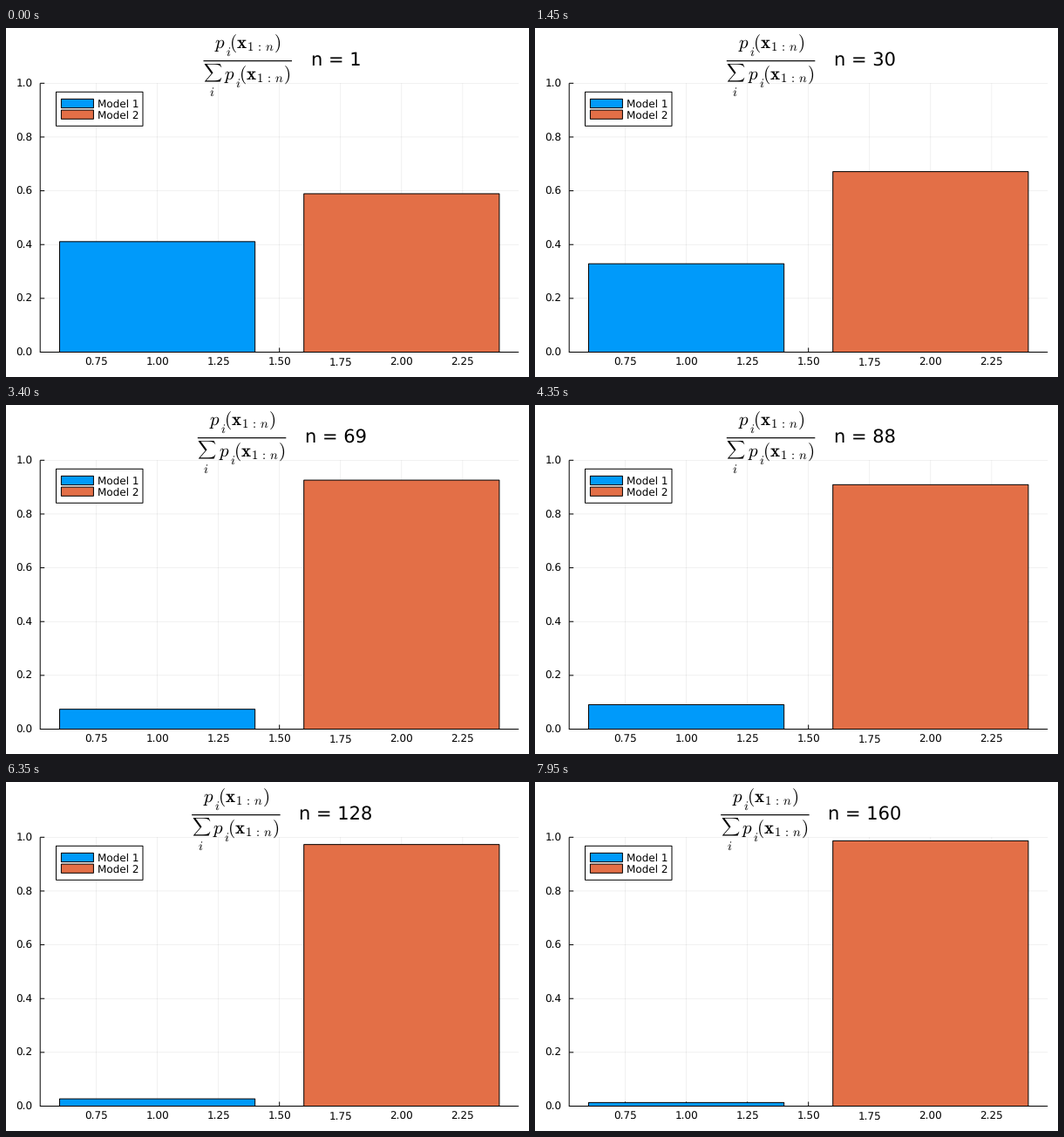
Recreate the animation shown at these times as a matplotlib script. Size 600 px wide and 400 px high, loop 8 s.

```python
import numpy as np
import matplotlib
import matplotlib.pyplot as plt
from matplotlib.animation import FuncAnimation
from matplotlib.patches import Rectangle

matplotlib.rcParams["font.family"] = "DejaVu Sans"
matplotlib.rcParams["mathtext.fontset"] = "cm"
matplotlib.rcParams["text.hinting"] = "none"

W, H, DPI = 600, 400, 100
FRAMES, INTERVAL = 160, 50
PX = 72 / DPI  # one pixel in points
LEFT, RIGHT, TOP, BOTTOM = 39.2, 588.2, 63.3, 371.5
XMIN, XMAX = 0.5205, 2.4795
BLUE, ORANGE = "#009AFA", "#E36F47"
GRID = "#0000001a"
TITLE, SMALL = 21, 14.7

# Log odds of model 1 at chosen sample counts, joined by coin-flip steps
KNOTS = [(1, -0.36), (18, 0.112), (34, -1.158), (43, -1.355), (50, -1.603),
         (69, -2.527), (78, -2.92), (88, -2.302), (102, -3.425),
         (119, -3.80), (128, -3.58), (148, -4.41), (160, -4.30)]
HEADS, TAILS = 0.146, -0.36


def log_odds():
    path = [KNOTS[0][1]]
    for (n0, a), (n1, b) in zip(KNOTS, KNOTS[1:]):
        m = n1 - n0
        tails = round((m * HEADS - (b - a)) / (HEADS - TAILS))
        count = np.floor(np.arange(m + 1) * tails / m + 0.25)
        steps = np.where(np.diff(count) > 0, TAILS, HEADS)
        steps += (b - a - steps.sum()) / m
        path.extend(a + np.cumsum(steps))
    return np.array(path)


P1 = 1 / (1 + np.exp(-log_odds()))


def px(x):
    return LEFT + (x - XMIN) / (XMAX - XMIN) * (RIGHT - LEFT)


def py(y):
    return BOTTOM + y * (TOP - BOTTOM)


fig = plt.figure(figsize=(W / DPI, H / DPI), dpi=DPI, facecolor="white")
ax = fig.add_axes([0, 0, 1, 1])
ax.set_xlim(0, W)
ax.set_ylim(H, 0)
ax.axis("off")


def line(x0, y0, x1, y1, color="black", width=1.0, z=1):
    item, = ax.plot([x0, x1], [y0, y1], color=color, lw=width * PX, zorder=z,
                    solid_capstyle="butt", snap=False)
    return item


def box(x0, y0, x1, y1, color, z):
    rect = Rectangle((x0, y0), x1 - x0, y1 - y0, facecolor=color,
                     edgecolor="black", lw=PX, zorder=z, snap=False)
    return ax.add_patch(rect)


def label(x, y, text, size=12, ha="left", va="baseline"):
    return ax.text(x, y, text, fontsize=size * PX, ha=ha, va=va, zorder=6)


def term(x, y):
    """The likelihood p_i(x_1:n) with its low-hanging index."""
    return [label(x, y, "$p$", TITLE),
            label(x + 13, y + 9, "$i$", SMALL),
            label(x + 17, y, r"$(\mathbf{x}_{1\,:\,n})$", TITLE)]


for x in np.arange(0.75, 2.3, 0.25):
    line(px(x), TOP, px(x), BOTTOM, GRID, 0.55, 0)
    line(px(x), BOTTOM, px(x), BOTTOM - 5)
    label(px(x), 387.2, f"{x:.2f}", ha="center")
for y in np.arange(0, 1.1, 0.2):
    line(LEFT, py(y), RIGHT, py(y), GRID, 0.55, 0)
    line(LEFT, py(y), LEFT + 5, py(y))
    label(30.4, py(y) + 4.4, f"{y:.1f}", ha="right")
line(LEFT, TOP, LEFT, BOTTOM + 0.5)
line(LEFT, BOTTOM, RIGHT, BOTTOM)

bars = [box(px(i - 0.4), BOTTOM, px(i + 0.4), BOTTOM, color, 3)
        for i, color in ((1, BLUE), (2, ORANGE))]

box(57.5, 73.3, 157, 112.3, "white", 4)
for i, color in enumerate((BLUE, ORANGE)):
    y = 81.4 + 12.7 * i
    box(63.4, y, 100.4, y + 10.2, color, 5)
    label(105.3, y + 9.4, f"Model {i + 1}")

counter = label(349.6, 43, "", TITLE)
rule = line(226.5, 37.7, 328, 37.7, width=1.2, z=6)
title = [counter, *term(239.3, 23), *term(250.3, 59),
         label(237.2, 53, r"$\sum$", SMALL, "center", "center"),
         label(233, 78, "$i$", SMALL)]
title_x = [part.get_position()[0] for part in title]
rule_x = rule.get_xdata()


def draw(frame):
    n = frame + 1
    shift = 6.68 * (len(str(n)) - 1)
    for part, x in zip(title, title_x):
        part.set_x(x - shift)
    rule.set_xdata(np.subtract(rule_x, shift))
    counter.set_text(f"n = {n}")
    for bar, p in zip(bars, (P1[frame], 1 - P1[frame])):
        bar.set_height(py(p) - BOTTOM)
    return [*bars, *title, rule]


anim = FuncAnimation(fig, draw, frames=FRAMES, interval=INTERVAL,
                     repeat=True, repeat_delay=0)
plt.show()
```
